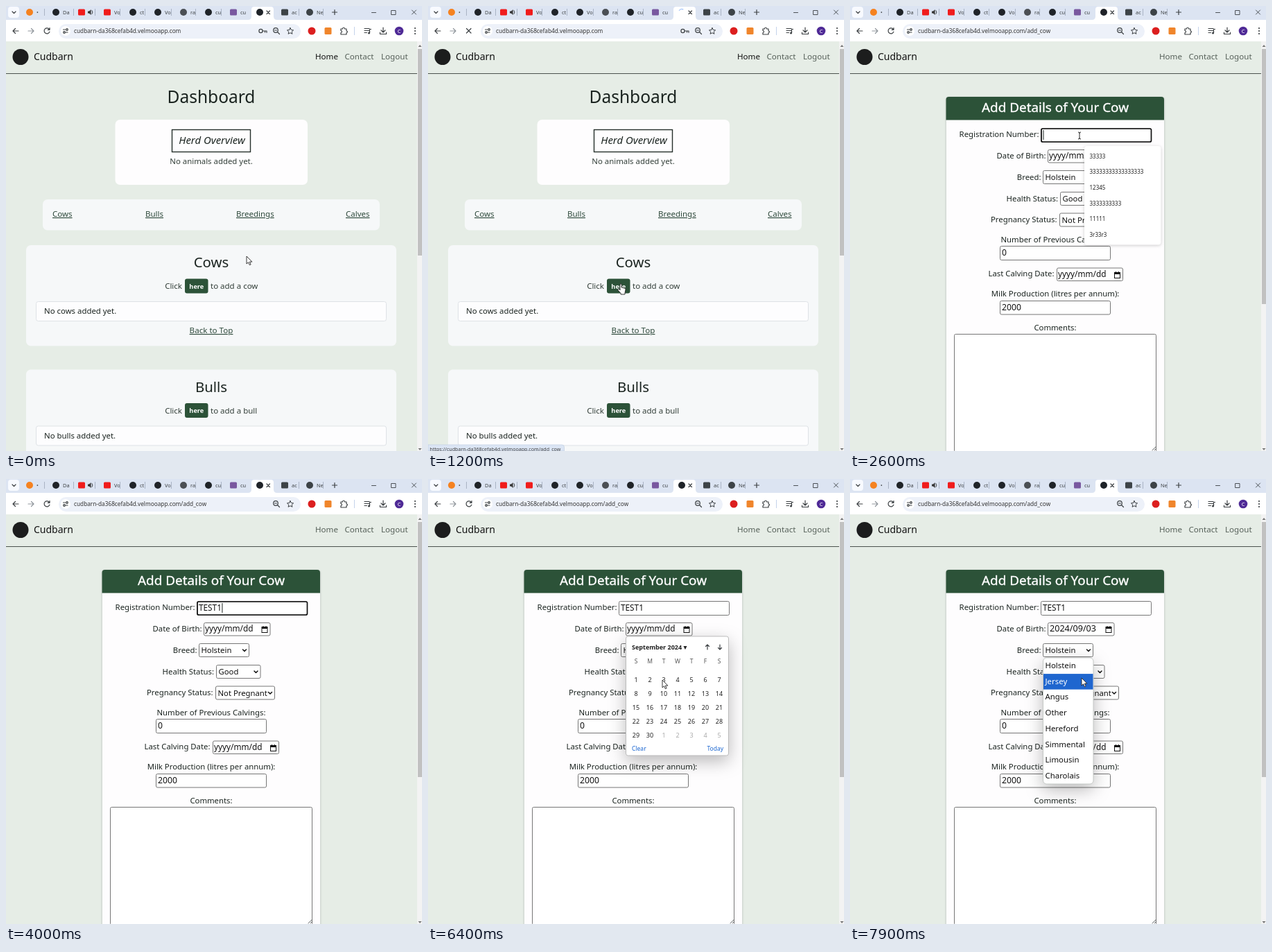
Write an HTML page that moves like this. It is 600 px wide and 642 px high and loops after 8 s.

```html
<!DOCTYPE html>
<html lang="en">
<head>
<meta charset="utf-8">
<title>Add a cow</title>
<style>
  html, body { margin: 0; width: 100%; height: 100%; overflow: hidden; background: #e6ede6; }
  svg { display: block; width: 600px; height: 642px; font-family: "Noto Sans", "Open Sans", sans-serif; fill: #1b2420; }
  text { white-space: pre; }
  .mid { text-anchor: middle; }
  .end { text-anchor: end; }
  .link { text-decoration: underline; fill: #2f4a3c; }
  .bold { font-weight: 700; }
  .line { fill: none; stroke-linecap: round; stroke-linejoin: round; }
  .field { fill: #fff; stroke: #767676; }
  .faint { filter: drop-shadow(0 1px 1px #0002); }
  .soft { filter: drop-shadow(0 1px 2px #0003); }
  .deep { filter: drop-shadow(0 8px 12px #0004); }
</style>
</head>
<body>
<svg id="stage" viewBox="0 0 600 642"></svg>
<script>
const LOOP = 8000, STEP = 100;
const GREEN = '#2c5238', PALE = '#f6f8f9', INK = '#3c4043';
const HOST = 'cudbarn-da368cefab4d.velmooapp.com';

const text = (x, y, s, size = 11.4, attrs = '') =>
  `<text x="${x}" y="${y}" font-size="${size}" ${attrs}>${s}</text>`;
const mid = (x, y, s, size, attrs = '') => text(x, y, s, size, `class="mid" ${attrs}`);
const box = (x, y, w, h, fill, rx = 0, attrs = '') =>
  `<rect x="${x}" y="${y}" width="${w}" height="${h}" fill="${fill}" rx="${rx}" ${attrs}/>`;
const dot = (x, y, r, fill) => `<circle cx="${x}" cy="${y}" r="${r}" fill="${fill}"/>`;
const line = (d, width = 1.2, color = INK) => `<path class="line" d="${d}" stroke="${color}" stroke-width="${width}"/>`;
const ring = (x, y, r) => `<circle class="line" cx="${x}" cy="${y}" r="${r}" stroke="${INK}" stroke-width="1.2"/>`;
const on = (from, to, body) => `<g data-on="${from}-${to}">${body}</g>`;

// Browser window
function tab(x, mark, label, edge) {
  return mark(x) + text(x + 10, 12, label, 7.4, `fill="${INK}"`) +
    (edge ? box(edge, 4, 1, 10, '#a9b3c4') : '');
}
const round = fill => x => dot(x, 9, 5, fill);
const square = fill => x => box(x - 5, 4.5, 10, 9, fill, 1.5);

function tabStrip() {
  const black = round('#1f2328'), red = square('#f01c1c');
  return box(0, 0, 600, 20, '#dce4f2') +
    box(3, 1, 16, 16, '#f8faff', 4) + line('M9 8l2.5 2.5L14 8') +
    tab(34, round('#f58220'), '•', 55) +
    tab(72, black, 'Da', 97) +
    tab(109, red, '', 128) +
    '<path d="M118 7.5h2l2.5-2.5v8l-2.5-2.5h-2z" fill="#333"/>' + line('M124 6.5q2 2.5 0 5', 1) +
    tab(146, red, 'Vo', 164) +
    tab(183, black, 'ct', 200) +
    tab(219, black, 'Vo', 238) +
    tab(256, round('#4b4f54'), 'ra', 273) +
    tab(292, black, 'cu', 310) +
    tab(328, square('#79589f'), 'cu', 0) +
    '<path d="M349 20q5 0 5-5V5q0-4 4-4h24q4 0 4 4v10q0 5 5 5z" fill="#fff"/>' +
    on(0, 1000, black(366)) + on(1500, LOOP, black(366)) +
    on(1000, 1500, '<path id="spin" d="M361.5 9a4.5 4.5 0 0 1 4.5-4.5" fill="none" stroke="#a8c7fa" stroke-width="1.3"/>') +
    line('M376 7l4.5 4.5M380.5 7l-4.5 4.5') +
    tab(402, square('#3d4347'), 'ac', 422) +
    tab(438, round('#3d4347'), 'Ne', 457) +
    line('M470.5 9h7M474 5.5v7') +
    line('M527.5 9.5h6M556 6.5h6v6h-6zM585.5 6l6 6M591.5 6l-6 6', 0.9);
}

function toolbar() {
  const reload = line('M62.4 33.6a4 4 0 1 0 .5 3.5M63 31.5v2.8h-2.8');
  return box(0, 20, 600, 31, '#fff') +
    line('M18 36h-8M13.5 32.5L10 36l3.5 3.5') +
    line('M32 36h8M36.5 32.5L40 36l-3.5 3.5', 1.2, '#8f959b') +
    on(0, 1000, reload) + on(1500, LOOP, reload) +
    on(1000, 1500, line('M55.5 32.5l6.5 6.5M62 32.5l-6.5 6.5')) +
    box(76, 26, 349, 21, '#edf1f9', 10.5) + dot(86, 36, 7, '#fff') +
    line('M82.5 34h3M89 38h-3') + ring(88, 34, 1.3) + ring(84, 38, 1.3) +
    on(0, 1500, text(98, 39, HOST, 8.25, 'fill="#333"') +
      ring(367.5, 36, 2.6) + line('M370 36h6v2.3M373.5 36v2')) +
    on(1500, LOOP, text(98, 39, HOST + '/add_cow', 8.25, 'fill="#333"')) +
    ring(389, 35, 3.3) + line('M391.5 37.5l3 3M387.5 35h3') +
    line('M410 31.5l1.4 3 3.2.4-2.4 2.2.7 3.2-2.9-1.6-2.9 1.6.7-3.2-2.4-2.2 3.2-.4z', 1) +
    dot(441, 36, 5.5, '#dc1f1f') + box(459.5, 31, 10, 10, '#f0852b', 1.5) +
    line('M483 33h2.5q0-2 1.5-2t1.5 2H491v3q1.5 0 1.5 1.2T491 38.5V41h-8v-2.5q1.5 0 1.5-1.5T483 35.5z') +
    box(502, 30, 1, 12, '#c5d3ea') +
    line('M517 32.5h7M517 35.5h7M517 38.5h3.5M524.5 39v-5.5h2') + dot(523.5, 39, 1.5, INK) +
    line('M544 31v6.5M541 35l3 3 3-3M539.5 38v2.5h9V38') +
    dot(567, 36, 6.3, '#4f2a96') + mid(567, 38.6, 'C', 7.5, 'fill="#fff"') +
    [32, 36, 40].map(y => dot(590, y, 1.1, INK)).join('');
}

const scrollbar = end => box(593, 51, 7, 591, '#f3f3f3') + box(594, 62, 6, end - 62, '#c1c1c1') +
  '<path d="M594.5 59l2.5-3 2.5 3zM594.5 638l2.5 3 2.5-3z" fill="#777"/>';

function siteBar(homeColor) {
  return box(0, 51, 593, 591, '#e6ede6') + dot(21, 73.5, 11.5, '#1c1d1d') +
    text(40, 78, 'Cudbarn', 14, 'fill="#111"') +
    text(446, 77, 'Home', 11.6, `fill="${homeColor}"`) +
    text(488.5, 77, 'Contact', 11.6, 'fill="#566059"') +
    text(541, 77, 'Logout', 11.6, 'fill="#566059"') +
    box(0, 97, 593, 1, '#4a524d');
}

// Dashboard
function section(y, title, one) {
  return box(29, y, 534, 145.5, PALE, 7) +
    mid(296, y + 32, title, 20.4) +
    text(254, y + 63, 'Click', 11.5, 'class="end" fill="#333f39"') +
    box(258, y + 48.5, 33.5, 21, GREEN, 3) +
    mid(274.8, y + 62.5, 'here', 9.2, 'fill="#fff" font-weight="700"') +
    text(295, y + 63, `to add a ${one}`, 11.5, 'fill="#333f39"') +
    box(43.5, y + 81.5, 505, 28, '#fdfdfe', 3, 'stroke="#dee2e6"') +
    text(55, y + 99, `No ${title.toLowerCase()} added yet.`) +
    text(296, y + 127, 'Back to Top', 11.6, 'class="mid link"');
}

function dashboard() {
  const links = [[67, 'Cows'], [201, 'Bulls'], [332, 'Breedings'], [490, 'Calves']];
  return siteBar('#111') + mid(296, 140, 'Dashboard', 24.5) +
    box(157.5, 164, 277.5, 94, '#fefdfe', 7) +
    box(239.5, 178.5, 113, 32, '#fefdfe', 0, 'stroke="#26302b" stroke-width="1.4"') +
    mid(297, 199, 'Herd Overview', 14.9, 'font-style="italic"') +
    mid(296, 228, 'No animals added yet.', 11.4, 'fill="#333f39"') +
    box(53, 279, 486, 44.5, PALE, 7) +
    links.map(([x, s]) => text(x, 304, s, 11.5, 'class="link"')).join('') +
    section(345, 'Cows', 'cow') + section(524.5, 'Bulls', 'bull') + scrollbar(360);
}

// Form
const label = (right, y, s) => text(right, y, s, 11.35, 'class="end"');
const field = (x, y, w, h, attrs = '') =>
  `<rect class="field" x="${x}" y="${y}" width="${w}" height="${h}" rx="2" ${attrs}/>`;
const select = (x, y, w, value) => field(x, y, w, 19) + text(x + 3, y + 13.5, value, 11.3, 'fill="#111"') +
  line(`M${x + w - 9} ${y + 8.5}l2.5 2.5 2.5-2.5`, 1.5, '#111');
const dateIcon = (x, y) => `<path d="M${x} ${y + 1}h2v-1h1v1h3v-1h1v1h2v9h-9zm1 3v5h7v-5z" fill="#111" fill-rule="evenodd"/>`;
const blankDate = (x, y) => text(x, y, 'yyyy/mm/dd', 11.8, 'fill="#111"');

function form() {
  return siteBar('#566059') +
    box(138.5, 131, 315, 520, '#fefdfe', 4, 'stroke="#d3dad4" class="faint"') +
    `<path d="M138.5 164.5V135q0-4 4-4h306.500q4 0 4 4v29.500z" fill="${GREEN}"/>` +
    mid(296, 153, 'Add Details of Your Cow', 18.9, 'fill="#fff" stroke="#fff" stroke-width=".35"') +
    label(272.5, 189, 'Registration Number:') + field(275.5, 176.5, 159, 20) +
    on(2500, 5800, field(276, 177, 158.5, 19, 'style="stroke:#101010;stroke-width:1.700"')) +
    '<text id="typed" x="278" y="189.5" font-size="11.8" fill="#111"></text>' +
    on(2500, 4400, '<rect class="caret" y="179" width="1" height="14"/>') +
    on(5200, 5800, '<rect class="caret" y="179" width="1" height="14"/>') +
    label(282.5, 220, 'Date of Birth:') + field(285.5, 207.5, 95.5, 18.5) + dateIcon(368.5, 212) +
    on(0, 6900, blankDate(287, 220)) + on(6900, LOOP, text(288, 220, '2024/09/03', 12.6, 'fill="#111"')) +
    label(275.5, 251, 'Breed:') + select(278.5, 237.5, 72, 'Holstein') +
    label(300, 282, 'Health Status:') + select(303.5, 268.5, 63.5, 'Good') +
    on(6900, 7200, box(303.5, 268.5, 63.5, 19, 'none', 2, 'stroke="#333"')) +
    label(298.5, 312, 'Pregnancy Status:') + select(302.5, 299, 85, 'Not Pregnant') +
    mid(296, 341, 'Number of Previous Calvings:', 11.35) + field(216.5, 346.5, 159, 20) +
    text(219, 360, '0', 12.2, 'fill="#111"') +
    label(294.5, 390, 'Last Calving Date:') + field(298.5, 378, 95, 18.5) + blankDate(300, 391) + dateIcon(381, 383) +
    mid(296, 419, 'Milk Production (litres per annum):', 11.35) + field(216.5, 425.5, 159, 19.5) +
    text(219, 439, '2000', 12.2, 'fill="#111"') +
    mid(296, 468, 'Comments:', 11.35) + field(150.5, 473.5, 291, 170) +
    line('M436 641l5-5M439 641l2-2', 0.8) + scrollbar(430);
}

function suggestions() {
  const items = ['33333', '3'.repeat(17), '12345', '3'.repeat(10), '11111', '3r33r3'];
  return box(338, 202, 110.5, 142.5, '#fff', 4, 'class="soft"') +
    items.map((s, i) => text(345.5, 219.5 + 22.7 * i, s, 8, 'fill="#222"')).join('');
}

function picker() {
  let out = box(285.5, 227, 148, 172, '#fff', 3, 'stroke="#bbb" class="deep"') +
    text(294, 246, 'September 2024 ▾', 9, 'class="bold" fill="#222"') +
    line('M403 246v-7M400.5 241.5l2.5-2.5 2.5 2.5M421 239v7M418.5 243.5l2.5 2.5 2.5-2.5');
  [...'SMTWTFS'].forEach((d, i) => out += mid(300 + 20 * i, 266, d, 8.5, 'fill="#555"'));
  out += on(6500, 6900, box(331, 281, 19, 18, '#dce9fb', 3));
  for (let i = 0; i < 35; i++) {
    const next = i >= 30;
    out += mid(300 + 20 * (i % 7), 293 + 20 * Math.floor(i / 7), i % 30 + 1, 9, `fill="${next ? '#aaa' : '#222'}"`);
  }
  return out + text(294, 392, 'Clear', 8.5, 'fill="#1a66d0"') + text(426, 392, 'Today', 8.5, 'class="end" fill="#1a66d0"');
}

function breeds() {
  const items = ['Holstein', 'Jersey', 'Angus', 'Other', 'Hereford', 'Simmental', 'Limousin', 'Charolais'];
  return box(278.5, 258, 72.5, 182, '#fff', 5, 'stroke="#c4c8c5" class="deep"') +
    box(279, 281, 71.5, 22.5, '#1f66cf', 0, 'id="pick"') +
    items.map((s, i) => text(281.5, 273 + 22.7 * i, s, 11.4, 'class="breed"')).join('');
}

const status = '<path d="M0 633h193q3.5 0 3.5 3.5V642H0z" fill="#dbe5f4" stroke="#bccadd" stroke-width=".6"/>' +
  text(2.5, 641.5, `https://${HOST}/add_cow`, 7.1, 'fill="#444"');

const pointers = {
  arrow: '<path d="M0 0v11l2.6-2.3 1.7 4 1.8-.8-1.7-3.8h3.5z" fill="#fff" stroke="#222" stroke-width=".9"/>',
  hand: '<path d="M-1 1q0-1.3 1.1-1.3T1.2 1v4l4.8 1.2q1.2.5 1 2L6 13v2H0v-1.5L-4 9q-.6-1.3.5-1.7T-1 8.8z" fill="#fff" stroke="#222" stroke-width=".9"/>',
  beam: '<path d="M-2-5q2 0 2 1.5Q0-5 2-5M0-4v8M-2 5q2 0 2-1.5Q0 5 2 5" fill="none" stroke="#222" stroke-width="1"/>'
};

const stage = document.getElementById('stage');
stage.innerHTML = on(0, 1500, dashboard()) + on(1500, LOOP, form()) + tabStrip() + toolbar() +
  on(700, 1500, status) + on(2600, 3600, suggestions()) + on(5900, 6900, picker()) +
  on(7400, LOOP, breeds()) + '<g id="pointer"></g>';

const timed = [...stage.querySelectorAll('[data-on]')].map(el => [el, ...el.dataset.on.split('-').map(Number)]);
const [typed, pointer, pick, spin] = ['typed', 'pointer', 'pick', 'spin'].map(id => document.getElementById(id));
const carets = stage.querySelectorAll('.caret'), options = stage.querySelectorAll('.breed');

// time, x, y of the pointer
const path = [
  [0, 347, 361], [100, 347, 361], [800, 278, 401], [1300, 278, 401], [1700, 311, 248], [1900, 311, 248],
  [2300, 331, 187], [5500, 331, 187], [5800, 376, 218], [5900, 376, 218], [6400, 338, 290],
  [6600, 342, 282], [7000, 342, 282], [7300, 340, 245], [7400, 340, 245], [7700, 338, 272], [7900, 334, 287], [LOOP, 334, 287]
];
// first moment of each pointer shape
const shapes = [[0, 'arrow'], [700, 'hand'], [1400, 'arrow'], [1700, 'beam'], [3300, ''], [5600, 'beam'], [5700, 'arrow']];
const keys = [3300, 3600, 3700, 3800, 4000];

function place(t) {
  const i = path.findIndex(p => p[0] > t), [t0, x0, y0] = path[i - 1], [t1, x1, y1] = path[i];
  const k = (t - t0) / (t1 - t0), e = k * k * (3 - 2 * k);
  return [x0 + (x1 - x0) * e, y0 + (y1 - y0) * e];
}

function draw(t) {
  for (const [el, from, to] of timed) el.style.display = t >= from && t < to ? '' : 'none';

  typed.textContent = 'TEST1'.slice(0, keys.filter(k => t >= k).length);
  const width = typed.textContent ? typed.getComputedTextLength() : 0;
  carets.forEach(c => c.setAttribute('x', 278.5 + width));

  const [x, y] = place(t), shape = shapes.filter(s => t >= s[0]).pop()[1];
  pointer.innerHTML = pointers[shape] || '';
  pointer.setAttribute('transform', `translate(${x} ${y})`);

  const chosen = y > 281 ? 1 : 0;
  pick.setAttribute('y', 258.5 + 22.6 * chosen);
  options.forEach((o, i) => o.setAttribute('fill', i === chosen ? '#fff' : '#111'));
  spin.setAttribute('transform', `rotate(${(t - 1200) * 0.36 + 30} 366 9)`);
}

let start;
function frame() {
  const now = performance.now();
  start ??= now;
  draw(Math.floor((now - start) % LOOP / STEP) * STEP);
  requestAnimationFrame(frame);
}
frame();
</script>
</body>
</html>
```
